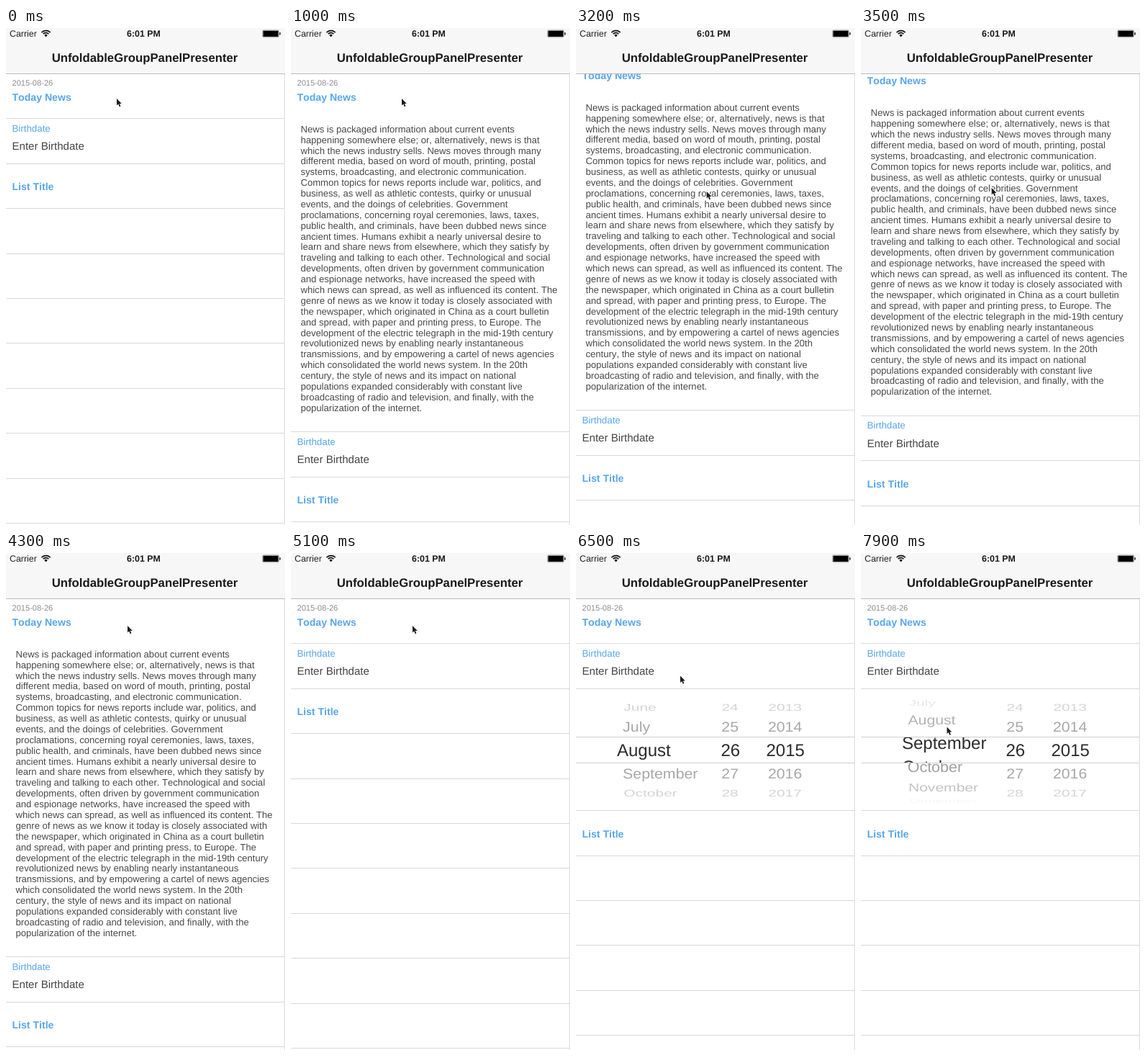
Animation of 388x690 px, one loop 8000 ms. Source, as an HTML page with a canvas:

```html
<!DOCTYPE html>
<html lang="en">
<head>
<meta charset="utf-8">
<style>
html, body { margin: 0; width: 100%; height: 100%; overflow: hidden; background: #fff; }
canvas { display: block; width: 388px; height: 690px; }
</style>
</head>
<body>
<canvas id="stage"></canvas>
<script>
const W = 388, H = 690, LOOP = 8000, STEP = 100;
const TOP = 63.5, ROW = 62.4, NEWS_H = 435, PICKER_H = 169.4;
const BLUE = '#58a6ec', DARK = '#444', LINE = '#d8d8d8';

const NEWS = `News is packaged information about current events
happening somewhere else; or, alternatively, news is that
which the news industry sells. News moves through many
different media, based on word of mouth, printing, postal
systems, broadcasting, and electronic communication.
Common topics for news reports include war, politics, and
business, as well as athletic contests, quirky or unusual
events, and the doings of celebrities. Government
proclamations, concerning royal ceremonies, laws, taxes,
public health, and criminals, have been dubbed news since
ancient times. Humans exhibit a nearly universal desire to
learn and share news from elsewhere, which they satisfy by
traveling and talking to each other. Technological and social
developments, often driven by government communication
and espionage networks, have increased the speed with
which news can spread, as well as influenced its content. The
genre of news as we know it today is closely associated with
the newspaper, which originated in China as a court bulletin
and spread, with paper and printing press, to Europe. The
development of the electric telegraph in the mid-19th century
revolutionized news by enabling nearly instantaneous
transmissions, and by empowering a cartel of news agencies
which consolidated the world news system. In the 20th
century, the style of news and its impact on national
populations expanded considerably with constant live
broadcasting of radio and television, and finally, with the
popularization of the internet.`.split('\n');

const MONTHS = ['January', 'February', 'March', 'April', 'May', 'June', 'July',
  'August', 'September', 'October', 'November', 'December'];

const canvas = document.getElementById('stage');
const ctx = canvas.getContext('2d');
const dpr = window.devicePixelRatio || 1;
canvas.width = W * dpr;
canvas.height = H * dpr;
ctx.scale(dpr, dpr);
ctx.textRendering = 'geometricPrecision';

const clamp = v => Math.max(0, Math.min(1, v));
const smooth = v => v * v * (3 - 2 * v);
const ease = (t, from, to) => smooth(clamp((t - from) / (to - from)));

// Piecewise eased track of [time, ...values]
function track(keys, t) {
  let i = 0;
  while (i < keys.length - 2 && t >= keys[i + 1][0]) i++;
  const [a, b] = [keys[i], keys[i + 1]];
  const p = ease(t, a[0], b[0]);
  return a.slice(1).map((v, n) => v + (b[n + 1] - v) * p);
}

function text(str, x, y, size, color, weight = 'normal', align = 'left') {
  ctx.font = `${weight} ${size}px "Liberation Sans", Arial, sans-serif`;
  ctx.fontKerning = 'none';
  ctx.textAlign = align;
  ctx.fillStyle = color;
  ctx.fillText(str, x, y);
}

function rect(x, y, w, h, color) {
  ctx.fillStyle = color;
  ctx.fillRect(x, y, w, h);
}

const rule = (y, color = LINE) => rect(0, Math.round(y - 0.5), W, 1, color);

function clipped(x, y, w, h, draw) {
  ctx.save();
  ctx.beginPath();
  ctx.rect(x, y, w, h);
  ctx.clip();
  draw();
  ctx.restore();
}

function faded(alpha, draw) {
  ctx.save();
  ctx.globalAlpha = alpha;
  draw();
  ctx.restore();
}

function statusBar() {
  text('Carrier', 5, 12.2, 12.4, '#222');
  text('6:01 PM', 191.5, 12.2, 12.4, '#1a1a1a', 'bold', 'center');
  ctx.strokeStyle = ctx.fillStyle = '#111';
  ctx.lineWidth = 1.6;
  for (const r of [8.4, 5.4]) {
    ctx.beginPath();
    ctx.arc(55.5, 12, r, -Math.PI * 0.76, -Math.PI * 0.24);
    ctx.stroke();
  }
  ctx.beginPath();
  ctx.moveTo(55.5, 12.4);
  ctx.arc(55.5, 12, 3, -Math.PI * 0.76, -Math.PI * 0.24);
  ctx.fill();
  ctx.strokeStyle = '#777';
  ctx.lineWidth = 0.7;
  ctx.beginPath();
  ctx.roundRect(356.8, 3, 22.6, 9.8, 1.5);
  ctx.stroke();
  rect(357.6, 3.8, 21, 8.2, '#000');
  rect(380.3, 6.2, 1.5, 3.4, '#222');
}

function navBar() {
  rect(0, 0, W, 63, '#f7f7f7');
  rect(0, 63, W, 1, '#b9b9b9');
  text('UnfoldableGroupPanelPresenter', 193, 47.3, 16.75, '#1a1a1a', 'bold', 'center');
  statusBar();
}

// One wheel column; k is the row's distance from the selected one
function wheel(label, left, pivot, pos, cy) {
  const ANGLE = 0.447, R = 76, BAND = 18;
  const rows = [];
  for (let i = Math.ceil(pos - 3.2); i <= pos + 3.2; i++) {
    const a = (i - pos) * ANGLE;
    rows.push({ str: label(i), k: Math.abs(i - pos), y: R * Math.sin(a), flat: Math.cos(a) });
  }
  const drawRow = (r, sx, sy, color) => {
    ctx.save();
    ctx.translate(pivot + (left - pivot) * sx, cy + r.y);
    ctx.scale(sx, sy);
    text(r.str, 0, 8.5, 24, color);
    ctx.restore();
  };
  const dim = () => rows.forEach(r => {
    const g = Math.round(Math.min(246, 152 + 15 * r.k * r.k));
    if (r.flat > 0.25) drawRow(r, 0.905 - 0.016 * r.k, 0.9 * r.flat, `rgb(${g},${g},${g})`);
  });
  clipped(0, cy - 80, W, 80 - BAND, dim);
  clipped(0, cy + BAND, W, 80 - BAND, dim);
  clipped(0, cy - BAND, W, BAND * 2, () =>
    rows.filter(r => r.k < 1.2).forEach(r => drawRow(r, 1, 1, '#2c2c2c')));
}

function picker(y, month) {
  const cy = y + 85.2;
  wheel(i => MONTHS[(i + 12) % 12], 57, 130, month, cy);
  wheel(i => String(i), 201.5, 209, 26, cy);
  wheel(i => String(i), 264.5, 286, 2015, cy);
  rule(cy - 18, '#cfcfcf');
  rule(cy + 18, '#cfcfcf');
}

function newsBody(y) {
  NEWS.forEach((line, i) => text(line, 13.5, y + 18.9 + i * 14.88, 13.08, '#484848'));
}

function table(scroll, news, pick, month) {
  let y = TOP - scroll;
  text('2015-08-26', 8.5, y + 16.8, 11.1, '#8c8c8c');
  text('Today News', 8.5, y + 37, 14.1, BLUE, 'bold');
  y += ROW;
  faded(1 - news, () => rule(y));

  if (news > 0) faded(news, () => newsBody(y));
  y += NEWS_H * news;
  rect(0, y, W, H, '#fff');
  if (news > 0) faded(news, () => rule(y));
  text('Birthdate', 8.5, y + 17.8, 13.3, BLUE);
  text('Enter Birthdate', 8.5, y + 43.5, 15.05, DARK);
  y += ROW;
  rule(y);

  if (pick > 0) faded(pick, () => picker(y, month));
  y += PICKER_H * pick;
  rect(0, y + 1, W, H, '#fff');
  rule(y);
  text('List Title', 8.5, y + 36.8, 14.1, BLUE, 'bold');
  for (y += ROW; y < H; y += ROW) rule(y);
}

function cursor(x, y) {
  ctx.beginPath();
  [[0, 0], [0, 9.6], [2.2, 7.6], [3.7, 11.2], [5.4, 10.5], [3.9, 7], [6.8, 7]]
    .forEach(([dx, dy]) => ctx.lineTo(x + dx, y + dy));
  ctx.closePath();
  ctx.strokeStyle = '#fff';
  ctx.lineWidth = 1.6;
  ctx.stroke();
  ctx.fillStyle = '#1c1c1c';
  ctx.fill();
}

const POINTER = [[0, 154, 98], [2550, 154, 98], [2950, 184, 285], [3020, 184, 285],
  [3200, 181.7, 227], [3300, 181.7, 222], [3950, 181.7, 222], [4300, 169, 101],
  [5350, 169, 101], [5600, 145, 170.5], [6750, 145, 170.5], [7200, 122, 284],
  [7400, 122, 284], [7900, 119.5, 241.5]];
const SCROLL = [[0, 0], [3020, 0], [3200, 30], [3300, 32], [3850, 0]];
const MONTH = [[0, 7], [7400, 7], [7900, 8.31]];

function render(t) {
  rect(0, 0, W, H, '#fff');
  const news = ease(t, 430, 850) - ease(t, 4430, 4850);
  const pick = ease(t, 5830, 6250);
  table(track(SCROLL, t)[0], news, pick, track(MONTH, t)[0]);
  rect(W - 1, 64, 1, H, '#dcdcdc');
  navBar();
  cursor(...track(POINTER, t));
}

const start = performance.now();
function tick() {
  const t = (performance.now() - start) % LOOP;
  render(Math.floor(t / STEP) * STEP);
  requestAnimationFrame(tick);
}
tick();
</script>
</body>
</html>
```
